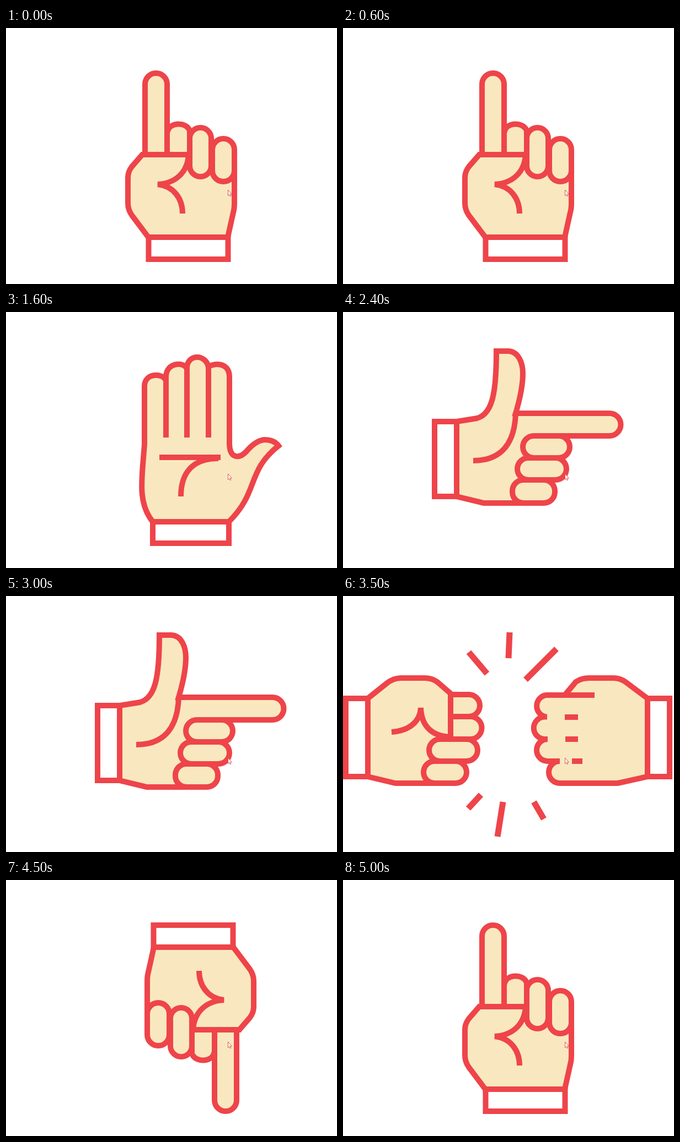
Animation, 600 px wide and 465 px high, one loop 5.1 s. Source, as an HTML page without scripts:

```html
<!DOCTYPE html>
<html lang="en">
<head>
<meta charset="utf-8">
<title>Hand signs</title>
<style>
  html, body { margin: 0; width: 100%; height: 100%; overflow: hidden; background: #fff; }
  svg { display: block; width: 600px; height: 465px; }
  .hands { stroke: #ee444a; stroke-width: 10; stroke-miterlimit: 2; fill: #f9e8bf; }
  .cuff { fill: #fff; stroke-miterlimit: 4; }
  .line { fill: none; }
  .burst { fill: #fcf598; stroke-linecap: round; }
  .rays { fill: none; stroke-width: 11; }
  .cursor { fill: #fff; stroke: #d8454c; stroke-width: .9; }

  .pose { visibility: hidden; animation: 5.1s step-end infinite; }
  .one { animation-name: one; }
  .five { animation-name: five; }
  .palm { animation-name: palm; }
  .aim { animation-name: aim; }
  .bump { animation-name: bump; }
  .punch { animation-name: punch; }
  .turn { transform-origin: 335px 251px; animation: turn 5.1s step-end infinite; }

  @keyframes one { 0%, 82.35%, 100% { visibility: visible } 13.72% { visibility: hidden } }
  @keyframes five { 0%, 25.49%, 100% { visibility: hidden } 13.72% { visibility: visible } }
  @keyframes palm { 0%, 39.21%, 100% { visibility: hidden } 25.49% { visibility: visible } }
  @keyframes aim { 0%, 60.78%, 100% { visibility: hidden } 39.21% { visibility: visible } }
  @keyframes bump { 0%, 70.58%, 100% { visibility: hidden } 60.78% { visibility: visible } }
  @keyframes punch { 0%, 82.35%, 100% { visibility: hidden } 70.58% { visibility: visible } }
  @keyframes turn {
    0%, 96.07%, 100% { transform: none }
    82.35% { transform: rotate(-90deg) }
    88.23% { transform: rotate(180deg) }
    92.15% { transform: rotate(90deg) }
  }
</style>
</head>
<body>
<svg viewBox="0 0 600 465">
  <defs>
    <path id="tip" d="M-46 -172C-25 -178 -16 -205 0 -205S25 -178 46 -172"/>
    <g id="tips3">
      <use href="#tip"/>
      <use href="#tip" transform="rotate(30)"/>
      <use href="#tip" transform="rotate(60)"/>
    </g>
  </defs>

  <g class="hands">
    <g class="pose one">
      <g class="turn">
        <path d="M292 230V190C296 170 326 170 333 186V230"/>
        <path d="M252 230V102a20 20 0 0 1 40 0V230"/>
        <path d="M331 230H247L228 252Q221 261 221 272V318Q221 330 228 340L258 380H402L412 335Q414 328 414 318V235"/>
        <rect x="333" y="181" width="39" height="89" rx="19.5"/>
        <rect x="374" y="201" width="40" height="78" rx="20"/>
        <path class="line" d="M247 230H331C329 262 308 282 275 284C304 287 320 310 320 337"/>
        <rect class="cuff" x="258.5" y="380" width="144" height="40"/>
      </g>
    </g>

    <g class="pose five">
      <path d="M260 379L165 199C200 185 238 210 253 265L212 102C206 70 239 67 247 97L286 218V78a20 20 0 0 1 40 0V218L354 98C361 66 396 75 391 103L376 222L416 118C430 88 464 105 455 131L418 240L416 325L404 379Z"/>
      <path class="line" d="M252 265C300 264 328 300 328 336M288 269L385 255"/>
      <rect class="cuff" x="260" y="379" width="144" height="41"/>
    </g>

    <g class="pose palm">
      <path d="M266 381C237 345 247 300 251 240V135C251 110 285 110 290 125V118C290 90 325 90 328 104V100C330 76 362 76 367 100C372 94 405 88 405 118V240C406 268 424 266 436 253Q452 234 468 232Q486 232 494 243C435 290 460 325 404 381Z"/>
      <path class="line" d="M290 118V228M328 100V228M367 98V228M278 264H389M385 266C340 266 317 290 317 335"/>
      <rect class="cuff" x="266" y="381" width="138" height="39"/>
    </g>

    <g class="pose aim">
      <path d="M206 199L243 193C270 185 278 150 278 71H300C318 72 326 92 326 112Q326 140 313 184H483a20.5 20.5 0 0 1 0 41H355V347H255L206 335Z"/>
      <rect x="326" y="225" width="85" height="40" rx="20"/>
      <rect x="316" y="265" width="89" height="40" rx="20"/>
      <rect x="307" y="305" width="77" height="42" rx="20"/>
      <path class="line" d="M313 182C312 235 290 270 236 270"/>
      <rect class="cuff" x="166" y="199" width="40" height="136"/>
    </g>

    <g class="pose bump">
      <path d="M195 179H228a20 20 0 0 1 0 40H195M195 219H231a20 20 0 0 1 0 41H195"/>
      <path d="M45 186L80 158Q92 149 105 149H148Q162 149 172 157L195 177V340H95L45 328Z"/>
      <rect x="156" y="260" width="88" height="40" rx="20"/>
      <rect x="146" y="300" width="78" height="40" rx="20"/>
      <path class="line" d="M88 247C120 245 140 228 141 203C142 235 160 255 195 256"/>
      <rect class="cuff" x="5" y="186" width="40" height="142"/>

      <path d="M552 186L512 156Q502 149 490 149H446Q432 149 422 156L402 180H368a20 20 0 0 0 0 39.5h2h-4a20 20 0 0 0 0 40.5h5a20 20 0 0 0 0 40h22a20 20 0 0 0 0 40H498L552 328Z"/>
      <path class="line" d="M400 180H456M402 220h24M403 260h23M415 300h19"/>
      <rect class="cuff" x="552" y="186" width="40" height="142"/>

      <path class="rays" d="M228 102L261 141M302 66L300 113M387 96L331 152M250 361L227 386M290 374L280 437M346 374L364 405"/>
    </g>

    <g class="pose punch">
      <g class="burst" transform="translate(292 257)">
        <use href="#tips3"/>
        <use href="#tips3" transform="rotate(90)"/>
        <use href="#tips3" transform="rotate(180)"/>
        <use href="#tips3" transform="rotate(270)"/>
        <circle r="172.5" stroke="none"/>
      </g>
      <path d="M173 235Q173 205 208 200Q212 178 236 176Q250 175 262 185Q272 160 296 160Q318 160 329 180Q340 165 355 166Q378 167 385 190Q390 205 411 301Q412 307 408 312L373 357Q365 367 354 367H275Q276 345 288 333L266 324Q258 331 243 331Q222 331 217 318Q173 318 173 285Z"/>
      <path class="line" d="M212 248V290Q212 331 243 331M264 228V300a31 35 0 0 0 62 0V227M373 248V300Q373 334 345 334Q332 333 321 327"/>
    </g>
  </g>

  <path class="cursor" d="M402.5 294v10.5l2.3-2l1.5 3.3l1.5-.7l-1.4-3.2h3Z"/>
</svg>
</body>
</html>
```
